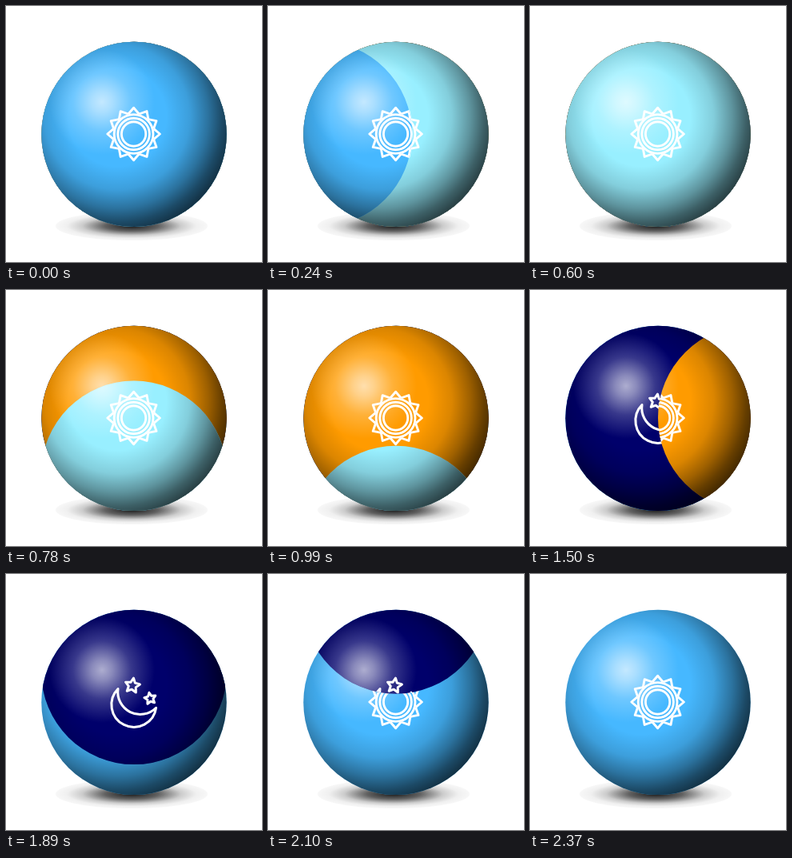
These frames come from a looping animation (320x320 px, 2.4 s). An HTML page:

```html
<!DOCTYPE html>
<html lang="en">
<head>
<meta charset="utf-8">
<title>Day cycle ball</title>
<style>
html, body { margin: 0; width: 100%; height: 100%; overflow: hidden; background: #fff; }
svg, .ball { position: absolute; left: 0; top: 0; width: 320px; height: 320px; }
svg.defs { width: 0; height: 0; }

.ball { clip-path: circle(115.7px at 160px 160.4px); }
.sky { color: #46b8ff; }
.noon { color: #98efff; }
.dusk { color: #ff9b00; }
.night { color: #00006b; }

/* Each layer's round window slides away; the 1ms lead keeps steps on time. */
.sky.top { animation: sky 2400ms -1ms infinite; }
.noon { animation: noon 2400ms -1ms infinite; }
.dusk { animation: dusk 2400ms -1ms infinite; }
.night { animation: night 2400ms -1ms infinite; }

@keyframes sky {
  0% { clip-path: circle(116px at 160px 160px); animation-timing-function: steps(20); }
  25%, 100% { clip-path: circle(116px at -80px 160px); }
}
@keyframes noon {
  0%, 25% { clip-path: circle(116px at 160px 160px); animation-timing-function: steps(20); }
  50%, 100% { clip-path: circle(116px at 160px 392px); }
}
@keyframes dusk {
  0%, 50% { clip-path: circle(116px at 160px 160px); animation-timing-function: steps(20); }
  75%, 100% { clip-path: circle(116px at 392px 160px); }
}
@keyframes night {
  0%, 75% { clip-path: circle(116px at 160px 160px); animation-timing-function: steps(19); }
  98.75%, 100% { clip-path: circle(116px at 160px -80px); }
}
</style>
</head>
<body>
<svg class="defs">
  <defs>
    <radialGradient id="glow" gradientUnits="userSpaceOnUse" cx="120" cy="120" r="66">
      <stop offset="0" stop-color="#fff" stop-opacity=".68"/>
      <stop offset=".2" stop-color="#fff" stop-opacity=".54"/>
      <stop offset=".55" stop-color="#fff" stop-opacity=".22"/>
      <stop offset="1" stop-color="#fff" stop-opacity="0"/>
    </radialGradient>
    <radialGradient id="shade" gradientUnits="userSpaceOnUse" cx="139" cy="139" r="146">
      <stop offset=".42" stop-opacity="0"/>
      <stop offset=".62" stop-opacity=".14"/>
      <stop offset=".78" stop-opacity=".38"/>
      <stop offset=".9" stop-opacity=".6"/>
      <stop offset="1" stop-opacity=".74"/>
    </radialGradient>
    <radialGradient id="floor">
      <stop offset="0" stop-opacity=".9"/>
      <stop offset=".35" stop-opacity=".62"/>
      <stop offset=".65" stop-opacity=".2"/>
      <stop offset=".85" stop-opacity=".06"/>
      <stop offset="1" stop-opacity=".03"/>
    </radialGradient>

    <g id="body">
      <rect width="320" height="320" fill="currentColor"/>
      <rect width="320" height="320" fill="url(#shade)"/>
      <rect width="320" height="320" fill="url(#glow)"/>
    </g>

    <path id="ray" d="M-6.7-25 0-32.8 6.7-25"/>
    <g id="rays">
      <use href="#ray"/>
      <use href="#ray" transform="rotate(30)"/>
      <use href="#ray" transform="rotate(60)"/>
    </g>
    <g id="sun" transform="translate(159.6 160)" fill="none" stroke="#fff" stroke-width="2.9" stroke-linejoin="round">
      <circle r="15.2"/>
      <circle r="19.8"/>
      <circle r="24.4"/>
      <use href="#rays"/>
      <use href="#rays" transform="rotate(90)"/>
      <use href="#rays" transform="rotate(180)"/>
      <use href="#rays" transform="rotate(270)"/>
    </g>

    <path id="star" vector-effect="non-scaling-stroke" d="M0-10 2.9-4 9.5-3.1 4.8 1.5 5.9 8.1 0 5-5.9 8.1-4.8 1.5-9.5-3.1-2.9-4Z"/>
    <g id="moon" fill="none" stroke="#fff" stroke-width="3" stroke-linejoin="round">
      <path d="M140 143.6A28 28 0 1 0 187.6 167.2A28 28 0 0 1 140 143.6Z"/>
      <use href="#star" transform="translate(158 139.5) rotate(9) scale(.95)"/>
      <use href="#star" transform="translate(180.2 155.6) rotate(-10) scale(.74)"/>
    </g>
  </defs>
</svg>

<svg><ellipse cx="157" cy="275" rx="95" ry="18" fill="url(#floor)"/></svg>
<div class="ball">
  <svg class="sky"><use href="#body"/><use href="#sun"/></svg>
  <svg class="night"><use href="#body"/><use href="#moon"/></svg>
  <svg class="dusk"><use href="#body"/><use href="#sun"/></svg>
  <svg class="noon"><use href="#body"/><use href="#sun"/></svg>
  <svg class="sky top"><use href="#body"/><use href="#sun"/></svg>
</div>
</body>
</html>
```
